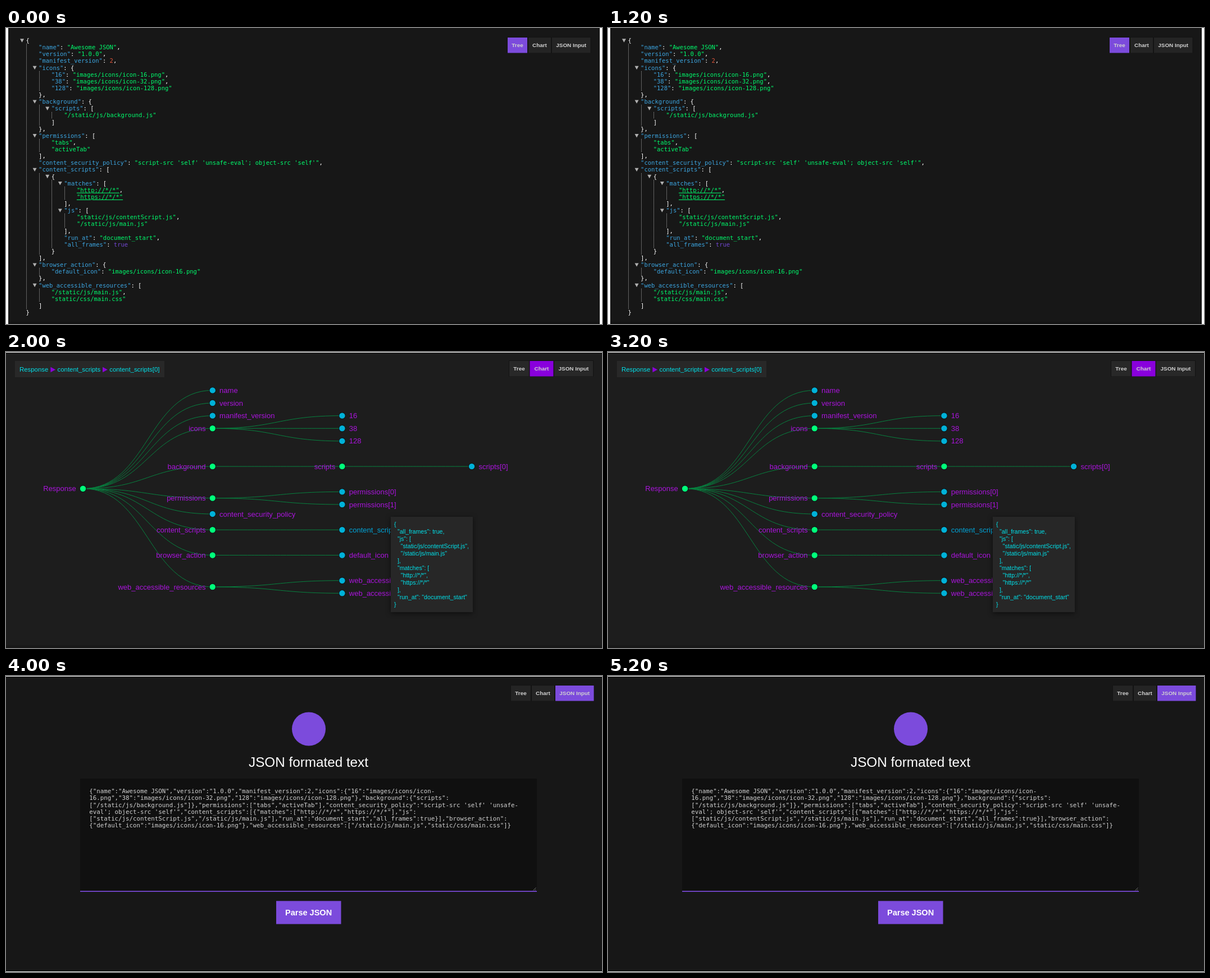
These frames come from a looping animation (1061 px wide and 528 px high, 6 s). An HTML page:

```html
<!DOCTYPE html>
<html lang="en">
<head>
<meta charset="utf-8">
<title>JSON viewer</title>
<style>
  html, body { margin: 0; width: 100%; height: 100%; overflow: hidden; background: #fff; }
  svg { display: block; width: 1061px; height: 528px; }
  text { white-space: pre; font-family: "Liberation Sans", Arial, sans-serif; }
  .mono { font-family: "DejaVu Sans Mono", monospace; }
  .key { fill: #3ca5e0; }
  .string { fill: #00fb6c; }
  .url { text-decoration: underline; }
  .number { fill: #e0563b; }
  .boolean { fill: #7147cf; }
</style>
</head>
<body>
<svg id="stage" viewBox="0 0 1061 528"></svg>
<script>
const DATA = {
  name: "Awesome JSON",
  version: "1.0.0",
  manifest_version: 2,
  icons: {
    16: "images/icons/icon-16.png",
    38: "images/icons/icon-32.png",
    128: "images/icons/icon-128.png"
  },
  background: { scripts: ["/static/js/background.js"] },
  permissions: ["tabs", "activeTab"],
  content_security_policy: "script-src 'self' 'unsafe-eval'; object-src 'self'",
  content_scripts: [{
    matches: ["http://*/*", "https://*/*"],
    js: ["static/js/contentScript.js", "/static/js/main.js"],
    run_at: "document_start",
    all_frames: true
  }],
  browser_action: { default_icon: "images/icons/icon-16.png" },
  web_accessible_resources: ["/static/js/main.js", "static/css/main.css"]
};
const VIOLET = "#7c4bdc", CYAN = "#00e1ea";

const rect = (x1, y1, x2, y2, fill, extra = "") =>
  `<rect x="${x1}" y="${y1}" width="${x2 - x1}" height="${y2 - y1}" fill="${fill}" ${extra}/>`;
const text = (x, y, size, fill, content, extra = "") =>
  `<text x="${x}" y="${y}" font-size="${size}" fill="${fill}" ${extra}>${content}</text>`;
const textLines = (x, y, step, size, fill, lines, extra) =>
  lines.map((line, i) => text(x, y + i * step, size, fill, line, extra)).join("");

// edges: left and right side of each tab in turn
function tabs(edges, top, active, color, idle) {
  const labels = ["Tree", "Chart", "JSON Input"];
  return rect(edges[0] - 1, top - 1, edges[5] + 1, top + 28, "#131313") +
    labels.map((label, i) => {
      const [left, right] = edges.slice(i * 2);
      return rect(left, top, right, top + 27.5, i === active ? color : idle) +
        text((left + right) / 2, top + 17.2, 9.9, "#d0d0d0", label,
          'font-weight="bold" text-anchor="middle"');
    }).join("");
}

function treeScene() {
  const step = 12.125;
  const indent = depth => 35.5 + 22.6 * depth;
  const center = row => 22.3 + step * row;
  let row = 0, out = "";

  const span = (cls, content) => `<tspan class="${cls}">${content}</tspan>`;
  const write = (depth, content) =>
    out += text(indent(depth), center(row++) + 3.7, 10.5, "#fff", content, 'class="mono"');

  function emit(value, label, depth, comma) {
    if (typeof value !== "object") {
      const url = /^https?:/.test(value) ? " url" : "";
      write(depth, label + span(typeof value + url, JSON.stringify(value)) + comma);
      return;
    }
    const isList = Array.isArray(value), entries = Object.entries(value);
    const x = indent(depth), y = center(row), first = row;
    out += `<path d="M${x - 10.5} ${y - 3}h7l-3.5 6.4z" fill="#b0b0b0"/>`;
    write(depth, label + (isList ? "[" : "{"));
    entries.forEach(([key, child], i) =>
      emit(child, isList ? "" : span("key", `"${key}"`) + ": ", depth + 1,
        i < entries.length - 1 ? "," : ""));
    const guideX = Math.floor(x + 1) + 0.5;
    out += `<path d="M${guideX} ${Math.round(center(first + 0.5))}V${Math.round(center(row - 0.5))}"
      stroke="#aaa" stroke-dasharray="1 1"/>`;
    write(depth, (isList ? "]" : "}") + comma);
  }

  emit(DATA, "", 0, "");
  return rect(4, 0, 1057, 528, "#171717") + rect(4, 524, 1057, 528, "#131313") + out +
    tabs([893, 928, 930, 970, 972, 1040.5], 17, 0, VIOLET, "#242424");
}

function chartScene() {
  // [label, slot, children]
  const root = ["Response", 7.75, [
    ["name", 0], ["version", 1], ["manifest_version", 2],
    ["icons", 3, [["16", 2], ["38", 3], ["128", 4]]],
    ["background", 6, [["scripts", 6, [["scripts[0]", 6]]]]],
    ["permissions", 8.5, [["permissions[0]", 8], ["permissions[1]", 9]]],
    ["content_security_policy", 9.75],
    ["content_scripts", 11, [["content_scripts[0]", 11]]],
    ["browser_action", 13, [["default_icon", 13]]],
    ["web_accessible_resources", 15.5,
      [["web_accessible_resources[0]", 15], ["web_accessible_resources[1]", 16]]]
  ]];
  const selected = "content_scripts[0]";
  const column = depth => 137 + 230.7 * depth;
  const slotY = slot => 68.4 + 22.62 * slot;
  let links = "", nodes = "";

  function place([label, slot, children], depth) {
    const x = column(depth), y = slotY(slot);
    nodes += `<circle cx="${x}" cy="${y}" r="5.8" fill="${children ? "#00ff7b" : "#00b2d9"}"
      stroke="#101818" stroke-width="1.2"/>` +
      text(x + (children ? -12.2 : 12.4), y + 4.6, 13, label === selected ? "#00a4d8" : "#aa14dc",
        label, `text-anchor="${children ? "end" : "start"}"`);
    for (const child of children || []) {
      const endX = column(depth + 1), midX = (x + endX) / 2, endY = slotY(child[1]);
      links += `<path d="M${x} ${y}C${midX} ${y} ${midX} ${endY} ${endX} ${endY}"/>`;
      place(child, depth + 1);
    }
  }
  place(root, 0);

  const sorted = Object.fromEntries(Object.entries(DATA.content_scripts[0]).sort());
  const tooltip = JSON.stringify(sorted, null, 2).split("\n");
  const arrow = x => `<path d="M${x} 26.8v9.4l8.8-4.7z" fill="#8b00d8"/>`;

  return rect(0, 1, 1061, 528, "#1d1d1d") + rect(0, 523.5, 1061, 528, "#181818") +
    rect(16, 16, 282, 45, "#282828") +
    text(24, 35.2, 11.4, CYAN, "Response") + arrow(79.3) +
    text(91.6, 35.2, 11.4, CYAN, "content_scripts") + arrow(172) +
    text(184.2, 35.2, 11.4, CYAN, selected) +
    `<g fill="none" stroke="#07813f">${links}</g>` + nodes +
    rect(685, 294, 831, 464, "#272727", 'style="filter:drop-shadow(0 2px 4px #0008)"') +
    textLines(691, 311.2, 12.95, 10.6, CYAN, tooltip) +
    tabs([896, 931, 932.5, 974.5, 976, 1045], 16, 1, "#8900dc", "#282828");
}

function inputScene() {
  const breaks = ['16.png","38', '["/static/js/back', "eval'", '["static/js/con', '{"default'];
  const lines = breaks
    .reduce((json, mark) => json.replace(mark, "\n" + mark), JSON.stringify(DATA))
    .split("\n");
  return rect(0, 1, 1061, 527, "#171717") +
    `<circle cx="539" cy="94.5" r="30" fill="${VIOLET}"/>` +
    text(538.5, 162.3, 24.25, "#fff", "JSON formated text", 'text-anchor="middle"') +
    rect(132, 183, 945, 385, "#101010") + rect(132, 383.3, 945, 385, VIOLET) +
    textLines(148.3, 209.2, 12.15, 10.75, "#d2d2d2", lines, 'class="mono"') +
    '<path d="M938.5 382.5l5-5m-2 5l2-2" stroke="#888" stroke-width=".8"/>' +
    rect(481, 401.3, 596.5, 442.5, VIOLET) +
    text(538.6, 426.6, 14.5, "#fff", "Parse JSON", 'font-weight="bold" text-anchor="middle"') +
    tabs([899, 934, 936, 976, 978, 1046.5], 17, 2, VIOLET, "#242424");
}

const stage = document.getElementById("stage");
stage.innerHTML = [treeScene, chartScene, inputScene].map(scene => `<g>${scene()}</g>`).join("");
const scenes = [...stage.children];

function tick() {
  const current = Math.floor(performance.now() % 6000 / 2000);
  scenes.forEach((scene, i) => scene.style.display = i === current ? "" : "none");
  requestAnimationFrame(tick);
}
tick();
</script>
</body>
</html>
```
